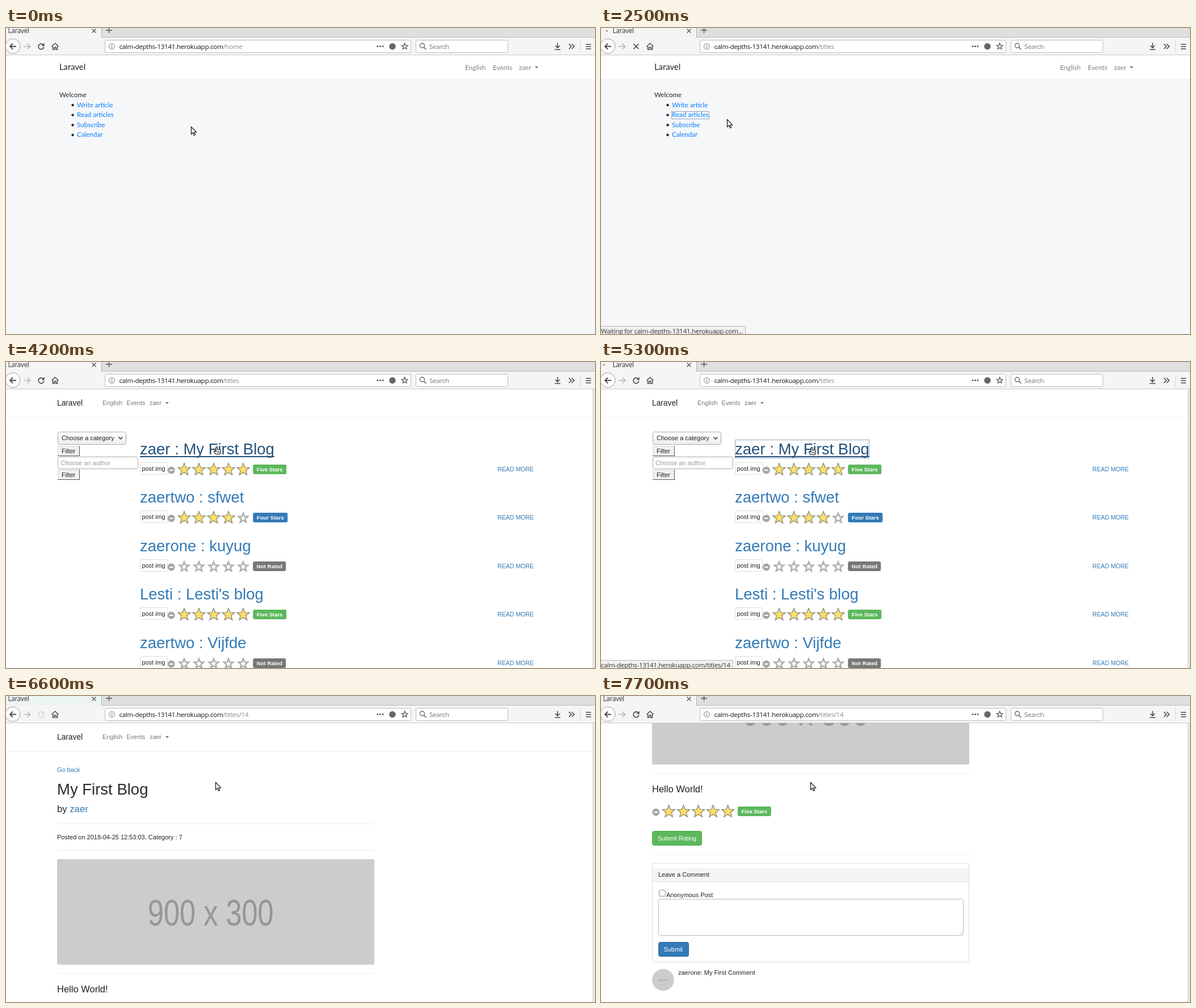
Write an HTML page with a canvas that moves like this. It is 1038 px wide and 540 px high and loops after 8000 ms.

```html
<!DOCTYPE html>
<html lang="en">
<head>
<meta charset="utf-8">
<title>Blog walkthrough</title>
<style>
  html, body { margin: 0; width: 100%; height: 100%; overflow: hidden; background: #fff; }
  canvas { display: block; }
</style>
</head>
<body>
<canvas id="stage" width="1038" height="540"></canvas>
<script>
const ctx = document.getElementById('stage').getContext('2d');
const LOOP = 8000;
const SANS = '"Liberation Sans", Arial, sans-serif';
const LATO = 'Lato, sans-serif';
const UI = '"Open Sans", "Noto Sans", sans-serif';
const HOST = 'calm-depths-13141.herokuapp.com';
const INK = '#222', LINK = '#337ab7', HOVER = '#23527c', GREEN = '#5cb85c', ICON = '#4a4a4a';
const NAME = 'zaer';

const POSTS = [
  [NAME + ' : My First Blog', 5],
  ['zaertwo : sfwet', 4],
  ['zaerone : kuyug', 0],
  ["Lesti : Lesti's blog", 5],
  ['zaertwo : Vijfde', 0],
];
const LABELS = {
  5: ['Five Stars', GREEN, 59],
  4: ['Four Stars', LINK, 61],
  0: ['Not Rated', '#777', 58],
};

// Pointer keys: time, x, y, glide (0 = jump on arrival)
const POINTER = [
  [300, 326, 174, 0], [1200, 182, 157, 1], [1500, 178, 155, 1], [1800, 178, 155, 1],
  [2500, 222, 161, 1], [3800, 333, 142, 0], [4200, 371, 149, 0], [5000, 371, 150, 0],
  [6600, 369, 152, 0],
];

// ---------- drawing helpers ----------
function rect(x, y, w, h, color) {
  ctx.fillStyle = color;
  ctx.fillRect(x, y, w, h);
}

function box(x, y, w, h, r, fill, line) {
  ctx.beginPath();
  ctx.roundRect(x + .5, y + .5, w - 1, h - 1, r);
  paint(fill, line);
}

function paint(fill, line, width = 1, path) {
  ctx.lineWidth = width;
  if (fill) { ctx.fillStyle = fill; path ? ctx.fill(path) : ctx.fill(); }
  if (line) { ctx.strokeStyle = line; path ? ctx.stroke(path) : ctx.stroke(); }
}

function disc(x, y, r, fill, line, width) {
  ctx.beginPath();
  ctx.arc(x, y, r, 0, 7);
  paint(fill, line, width);
}

function stroke(d, color = ICON, width = 1.6) {
  paint(null, color, width, new Path2D(d));
}

// Returns the x where the text ends
function text(s, x, y, size, color = INK, font = SANS, weight = 400) {
  ctx.font = `${weight} ${size}px ${font}`;
  ctx.letterSpacing = font === UI ? '-0.3px' : '0px';
  ctx.fillStyle = color;
  ctx.fillText(s, x, y);
  return x + ctx.measureText(s).width;
}

function caret(x, y, color) {
  paint(color, null, 1, new Path2D(`M${x - 3} ${y}h6l-3 3z`));
}

function dotted(x, y, w, h) {
  ctx.setLineDash([1, 1]);
  ctx.lineWidth = 1;
  ctx.strokeStyle = HOVER;
  ctx.strokeRect(x + .5, y + .5, w - 1, h - 1);
  ctx.setLineDash([]);
}

function star(x, y, r, fill, line, width) {
  ctx.beginPath();
  for (let i = 0; i < 10; i++) {
    const a = i * Math.PI / 5 - Math.PI / 2, d = i % 2 ? r * .43 : r;
    ctx.lineTo(x + d * Math.cos(a), y + d * Math.sin(a));
  }
  ctx.closePath();
  paint(fill, line, width);
}

function rating(x, y, score) {
  disc(x, y + 1, 6.5, '#a5a5a5');
  rect(x - 3.5, y, 7, 2, '#fff');
  for (let i = 0; i < 5; i++) {
    const cx = x + 22.7 + i * 26;
    if (i < score) star(cx, y, 11.6, '#fbdf69', '#777', 1.1);
    else star(cx, y + .5, 8.8, '#fff', '#aaa', 2.3);
  }
  const [label, color, width] = LABELS[score];
  box(x + 144, y - 9, width, 17, 2, color, color);
  text(label, x + 150.5, y + 3, 9.6, '#fff', SANS, 700);
}

// ---------- pages ----------
function homePage(s) {
  rect(0, 48, 1038, 492, '#f5f7f9');
  rect(0, 48, 1038, 43, '#fff');
  rect(0, 91, 1038, 1, '#e6e8ea');
  text('Laravel', 94, 74, 14.8, '#222', LATO);
  text('English', 809, 74, 11.7, '#808080', LATO);
  text('Events', 858, 74, 11.7, '#808080', LATO);
  text(NAME, 904, 74, 11.7, '#808080', LATO);
  caret(935, 68, '#666');
  text('Welcome', 94, 122, 11.6, INK, LATO);
  ['Write article', 'Read articles', 'Subscribe', 'Calendar'].forEach((item, i) => {
    const y = 139.5 + i * 17.6, hot = s.hover && i === 1;
    disc(117.5, y - 3.5, 2.2, INK);
    const end = text(item, 125, y, 11.6, hot ? '#0056b3' : '#0a7cff', LATO);
    if (hot) rect(125, 158, end - 125, 1, '#0056b3');
  });
  if (s.loading) dotted(124, 147, 67, 14);
}

function blogNav() {
  text('Laravel', 90, 77, 13.75);
  text('English', 170, 76, 10.75, '#777');
  text('Events', 212.5, 76, 10.75, '#777');
  text(NAME, 253, 76, 10.75, '#777');
  caret(284, 71, '#666');
  rect(0, 97, 1033, 1, '#efefef');
}

function filterButton(y) {
  rect(91, y, 39, 18, '#555');
  rect(91, y, 38, 17, '#ddd');
  rect(92, y + 1, 37, 16, '#efefef');
  text('Filter', 98, y + 13, 10.9);
}

function listPage(s) {
  blogNav();
  const shade = ctx.createLinearGradient(0, 123, 0, 146);
  shade.addColorStop(0, '#fff');
  shade.addColorStop(1, '#ececec');
  box(91, 123, 121, 23, 3, shade, '#aaa');
  text('Choose a category', 98, 138, 11.05);
  stroke('M198.5 132.5l3.5 3.5 3.5-3.5', '#333', 1.5);
  filterButton(148);
  box(91, 167, 142, 22, 3, '#fff', '#aaa');
  text('Choose an author', 96, 181.5, 11.05, '#999');
  filterButton(190);

  POSTS.forEach(([title, score], i) => {
    const y = Math.round(i * 85.4), hot = s.hover && !i;
    const end = text(title, 236, 163 + y, 27.5, hot ? HOVER : LINK);
    if (hot) rect(236, 166, end - 236, 2, HOVER);
    box(236, 177 + y, 49, 22, 2, '#fff', '#ddd');
    text('post img', 239.5, 192 + y, 10.85);
    rating(291.3, 190 + y, score);
    text('READ MORE', 866, 193 + y, 10.6, LINK);
  });
  if (s.loading) dotted(236, 137, 237, 33);
}

function rule(y) { rect(90, y, 559, 1, '#eee'); }

function postPage(s) {
  ctx.save();
  ctx.translate(0, -s.scroll);
  if (!s.scroll) blogNav();
  text('Go back', 90, 134, 10.9, LINK);
  text('My First Blog', 90, 174, 27.5, '#2b2b2b');
  text(NAME, text('by ', 90, 205, 16.7), 205, 16.7, LINK);
  rule(225);
  text('Posted on 2018-04-25 12:53:03, Category : 7', 90, 253, 11);
  rule(272);

  ctx.beginPath();
  ctx.roundRect(90, 288, 559, 186, 2);
  paint('#ccc');
  ctx.save();
  ctx.translate(250, 405);
  ctx.scale(.77, 1); // condensed face of the placeholder picture
  text('900 x 300', 0, 0, 65.5, '#969696');
  ctx.restore();

  rule(489);
  text('Hello World!', 90, 523, 16.5);
  rating(96.8, 557, 5);
  box(90, 591, 88, 26, 3, GREEN, '#4cae4c');
  text('Submit Rating', 100, 608, 10.85, '#fff');
  rule(632);

  box(90, 648, 559, 175, 2, '#fff', '#ddd');
  rect(91, 657, 557, 23, '#f5f5f5');
  rect(91, 680, 557, 1, '#ddd');
  text('Leave a Comment', 101, 672, 11);
  box(102, 695, 12, 12, 2.5, '#f8f8f8', '#999');
  text('Anonymous Post', 115, 708, 10.85);
  box(101, 711, 538, 65, 3, '#fff', '#bbb');
  stroke('M632 774l5-5M635 774l2-2', '#bbb', 1);
  box(101, 787, 54, 26, 3, LINK, '#2e6da4');
  text('Submit', 110.5, 804, 10.9, '#fff');
  disc(109.5, 854, 19.3, '#ccc');
  text('50 x 50', 102, 856, 4.2, '#8c8c8c', SANS, 700);
  text('zaerone: My First Comment', 136, 845, 11);
  ctx.restore();
}

// ---------- browser frame ----------
function chrome(s) {
  rect(0, 0, 1038, 17, '#dfdfdf');
  rect(169, 16, 869, 1, '#bcbcbc');
  rect(0, 17, 1038, 30, '#f5f5f5');
  rect(0, 47, 1038, 1, '#c8c8c8');
  rect(0, 0, 168, 17, s.burst ? '#edf4f4' : '#f5f5f5');
  rect(168, 0, 1, 17, '#b0b0b0');
  text('Laravel', s.loading ? 20.5 : 3.5, 9, 11.8, '#333', UI);
  if (s.loading) disc(s.dot, 5, 1.6, '#888');
  stroke('M151.5 1.5l7 7M158.5 1.5l-7 7', '#555', 1.4);
  stroke('M181.5 -1v10M176 4h11', '#555', 1.4);

  disc(12, 32, 13, '#fdfdfd', '#a0a0a0', 1);
  stroke('M18 32.5H7M12 27.5l-5 5 5 5', ICON, 1.8);
  stroke('M31 32.5h11M37.5 27.5l5 5-5 5', '#b5b5b5', 1.6);
  if (s.reload === 'stop') stroke('M57.5 28l9 9M66.5 28l-9 9', ICON, 1.7);
  else {
    const tint = s.reload === 'off' ? '#d6d6d6' : ICON;
    stroke('M65.5 29.5a4.8 4.8 0 1 0 1.2 4', tint, 1.7);
    paint(tint, null, 1, new Path2D('M67.7 26.5v5.3h-5.3z'));
  }
  stroke('M80.5 32.5l6-5.5 6 5.5M82.5 32v6h2.7v-4h2.6v4h2.7v-6', ICON, 1.5);

  box(174, 21, 540, 23, 2, '#fff', '#bdbdbd');
  disc(186.5, 32.5, 5, null, '#777', 1);
  rect(186, 31.5, 1.2, 4, '#777');
  rect(186, 29.3, 1.2, 1.3, '#777');
  text(s.path, text(HOST, 199.5, 37, 11.6, '#151515', UI), 37, 11.6, '#888', UI);
  for (let x = 655; x < 667; x += 4.5) disc(x, 32.3, 1.5, '#555');
  disc(681, 32.5, 5.7, '#666');
  star(702.7, 32.5, 5.6, null, '#555', 1.3);

  box(722, 21, 163, 23, 2, '#fff', '#bdbdbd');
  disc(733.5, 31, 4, null, '#666', 1.4);
  stroke('M736.5 34l4 4', '#666', 1.7);
  text('Search', 746, 37, 11.6, '#777', UI);

  stroke('M972 26.5v8M968 31l4 4 4-4M967 38h10', ICON, 1.6);
  stroke('M992 28l4.3 4.5-4.3 4.5M997 28l4.3 4.5-4.3 4.5', ICON, 1.6);
  rect(1012, 22, 1, 22, '#d8d8d8');
  for (const y of [28, 32, 36]) rect(1022, y, 9, 1.5, ICON);
}

function statusBar(message) {
  if (!message) return;
  ctx.font = `400 11.6px ${UI}`;
  ctx.letterSpacing = '-0.3px';
  const width = Math.round(ctx.measureText(message).width) + 5;
  rect(0, 526, width, 14, '#b8b8b8');
  rect(0, 527, width - 1, 13, '#f1f1f1');
  text(message, 0, 539, 11.6, '#333', UI);
}

const ARROW = new Path2D('M0 0V13L3 10.3 5 15 7.2 14 5.2 9.7 9 9.4Z');
const HAND = new Path2D('M-1.4 1Q0-.8 1.3 1V5H5Q6.4 5 6.4 7V10L5.4 13H-2L-4.8 9Q-5 7-3.4 7.2L-1.4 8.6ZM1.3 8v2.5M3.6 8v2.5');

function pointer(s) {
  ctx.save();
  ctx.translate(Math.round(s.x) + .5, Math.round(s.y) + .5);
  paint('#fff', '#111', 1.2, s.hover ? HAND : ARROW);
  ctx.restore();
}

// ---------- timeline ----------
function pointerAt(t) {
  let i = POINTER.findLastIndex(k => k[0] <= t);
  if (i < 0) i = 0;
  const [t0, x0, y0] = POINTER[i], next = POINTER[i + 1];
  if (!next || !next[3] || t < t0) return [x0, y0];
  const p = (t - t0) / (next[0] - t0), e = p * p * (3 - 2 * p);
  return [x0 + (next[1] - x0) * e, y0 + (next[2] - y0) * e];
}

function stateAt(time) {
  const t = Math.floor(time / 100) * 100;
  const between = (a, b) => t >= a && t < b;
  const [x, y] = pointerAt(t);
  const page = t < 3500 ? homePage : t < 6600 ? listPage : postPage;
  const hover = between(1200, 3500) ? x < 190 : between(3800, 6600);
  let status = '';
  if (between(1300, 3500)) status = hover ? HOST + '/titles' : `Waiting for ${HOST}…`;
  if (between(4600, 6200)) status = HOST + '/titles/14';
  if (between(6200, 6600)) status = `Transferring data from ${HOST}…`;
  return {
    x, y, page, hover, status,
    path: t < 2400 ? '/home' : t < 6200 ? '/titles' : '/titles/14',
    loading: between(1800, 3500) || between(5300, 6600),
    dot: t < 3500 ? 9 - 4 * Math.cos((Math.min(t, 2500) - 1800) / 160) : t < 6200 ? 5 : 11,
    reload: between(2400, 3500) || between(6200, 6600) ? 'stop'
      : between(3500, 3800) || between(6600, 7000) ? 'off' : 'on',
    burst: between(6600, 7000),
    scroll: t < 7000 ? 0 : t < 7300 ? 44 : t < 7700 ? 45 : 353,
  };
}

function frame() {
  const s = stateAt(performance.now() % LOOP);
  rect(0, 0, 1038, 540, '#fff');
  s.page(s);
  if (s.page !== homePage) rect(1033, 48, 5, 492, '#e6e6e6');
  chrome(s);
  statusBar(s.status);
  pointer(s);
  requestAnimationFrame(frame);
}
frame();
</script>
</body>
</html>
```
